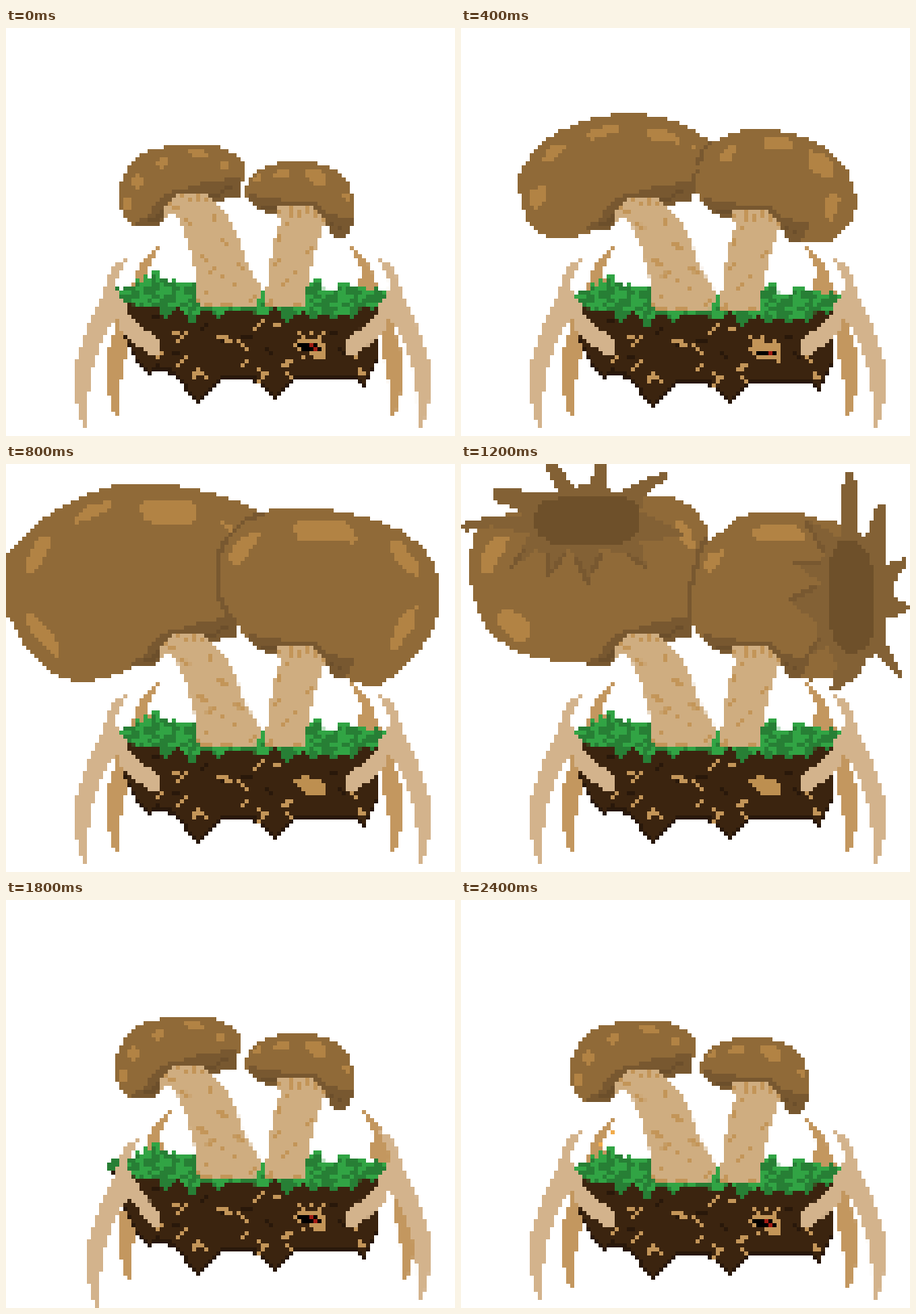
Animation of 555x505 px, one loop 2.6 s. Source, as an HTML page without scripts:

```html
<!DOCTYPE html>
<html lang="en">
<head>
<meta charset="utf-8">
<title>Walking mushrooms</title>
<style>
html, body { margin: 0; width: 100%; height: 100%; overflow: hidden; background: #fff; }
svg { display: block; width: 555px; height: 505px; shape-rendering: crispEdges; }

.cap { fill: #906a38; }
.shade { fill: #785830; }
.deep { fill: #6e502a; }
.hi { fill: #b28344; }
.flare { fill: #836135; }
.stem { fill: #cfad80; }
.leg { fill: #d3b38c; }
.back { fill: #c3975f; }
.soil { fill: #3b240f; }
.dark { fill: #29180a; }
.grass { fill: #277f35; }
.line { fill: none; stroke-width: 5; stroke-linecap: square; }
.tan { stroke: #c39558; }
.seam { stroke: #785830; }
.blade { stroke: #31a444; }

.body, .lcap, .lstem, .small, .open, .shut, .lf, .stubl, .rf, .stubr, .bl, .br {
  animation: 2.6s step-end infinite;
}
.stubl, .stubr { transform-origin: 190px 400px; }
.flash { visibility: hidden; animation: flash 2.6s step-end infinite; }
.t2 { animation-delay: .4s; }
.t3 { animation-delay: .6s; }
.t4 { animation-delay: .8s; }
.t5 { animation-delay: 1s; }
.t6 { animation-delay: 1.2s; }
.t12 { animation-delay: 2.4s; }
@keyframes flash { 0% { visibility: visible } 7.692%, 100% { visibility: hidden } }

.body { animation-name: bob; }
@keyframes bob {
  0%, 53.846%, 84.615% { transform: none }
  7.692%, 76.923%, 92.307%, 100% { transform: translateY(5px) }
}
.lcap { animation-name: sway; }
@keyframes sway {
  0%, 53.846%, 84.615% { transform: none }
  7.692%, 69.23%, 92.307%, 100% { transform: translateX(-5px) }
}
.lstem { animation-name: lean; }
@keyframes lean {
  0%, 53.846%, 84.615% { transform: none }
  7.692%, 69.23%, 92.307%, 100% { transform: matrix(1, 0, .036, 1, -12.4, 0) }
}
.small, .open { animation-name: rest; }
@keyframes rest {
  0%, 53.846%, 100% { visibility: visible }
  15.384% { visibility: hidden }
}
.shut { animation-name: shut; }
@keyframes shut {
  0%, 53.846%, 100% { visibility: hidden }
  23.076% { visibility: visible }
}
.lf { animation-name: lf; }
@keyframes lf {
  0%, 84.615%, 100% { transform: none }
  53.846% { transform: translate(20px, 0) }
  61.538% { transform: translate(20px, 10px) }
  69.23% { transform: translate(15px, 10px) }
  76.923% { transform: translate(5px, 5px) }
}
.stubl { animation-name: stubl; }
@keyframes stubl {
  0%, 84.615%, 100% { transform: none }
  53.846% { transform: scaleX(.6) }
  69.23% { transform: scaleX(.7) }
  76.923% { transform: scaleX(.9) }
}
.rf { animation-name: rf; }
@keyframes rf {
  0%, 92.307%, 100% { transform: none }
  76.923% { transform: translateX(-10px) }
  84.615% { transform: translateX(-20px) }
}
.stubr { animation-name: stubr; }
@keyframes stubr {
  0%, 92.307%, 100% { transform: none }
  76.923% { transform: scaleX(1.2) }
  84.615% { transform: scaleX(1.4) }
}
.bl, .br { animation-name: back; }
@keyframes back {
  0%, 92.307%, 100% { transform: none }
  61.538% { transform: translate(5px, -20px) }
  69.23% { transform: translate(15px, -10px) }
  76.923% { transform: translate(20px, -5px) }
  84.615% { transform: translate(20px, 0) }
}
</style>
</head>
<body>
<svg viewBox="0 0 555 505" xmlns="http://www.w3.org/2000/svg">
<defs>
  <!-- samples the middle of every 5 x 5 block and spreads it -->
  <filter id="pixel" filterUnits="userSpaceOnUse" x="0" y="0" width="555" height="505" color-interpolation-filters="sRGB">
    <feFlood x="2" y="2" width="1" height="1"/>
    <feComposite x="0" y="0" width="5" height="5"/>
    <feTile result="dots"/>
    <feComposite in="SourceGraphic" in2="dots" operator="in"/>
    <feMorphology operator="dilate" radius="2"/>
  </filter>

  <path id="soil" d="M130 333L145 380 163 415 177 431 188 423 208 430 237 465 270 434 295 434 312 440 332 461 355 436 375 434 430 434 443 446 450 430 460 410 460 370 467 338Z"/>
  <path id="grass" d="M125 325L137 319 142 324 150 318 160 318 160 310 170 314 171 304 180 309 180 300 190 300 190 311 197 310 200 320 206 309 210 316 240 315 310 315 317 325 322 318 370 320 380 310 390 310 388 322 408 325 410 315 425 315 425 324 430 319 440 319 452 326 460 319 458 325 470 325 468 332 455 350 440 343 430 360 415 354 405 362 395 352 380 361 370 350 358 356 345 365 335 346 318 356 300 350 270 351 262 361 255 350 240 351 230 368 223 354 212 346 195 361 190 346 165 346 155 341 145 343 135 335 125 335Z"/>
  <clipPath id="lawn"><use href="#grass"/></clipPath>
  <clipPath id="westward"><path d="M0 0H465V300H0Z"/></clipPath>

  <path id="leg" d="M150 285L135 290 126 310 117 335 105 360 95 385 87 410 85 420 85 440 87 465 95 494 100 494 102 455 105 430 115 395 125 372 137 362 150 362 150 345 138 330 136 315 140 302Z"/>
  <path id="stub" d="M132 338L140 345 190 388 190 403 177 406 140 372Z"/>
  <path id="hind" d="M190 270L180 275 165 295 155 320 140 350 130 390 125 405 125 440 130 465 135 480 140 480 140 450 145 425 150 400 150 385 160 350 180 325 180 312 174 306 180 288Z"/>

  <g id="lshade">
    <path class="shade" d="M290 185L245 190 230 197 207 200 190 212 180 224 176 234 163 239 160 245 187 245 195 238 195 222 210 207 250 206 255 214 285 211 290 205Z"/>
    <path class="line" stroke="#6c4f2b" d="M252.5 207.5h10l10-10h5M177.5 237.5h10l5-10"/>
  </g>
  <g id="rshade">
    <path class="shade" d="M300 203L320 211 337 211 342 216 385 215 398 229 430 237 426 250 420 260 410 260 400 254 395 239 380 221 337 221 332 230 315 227 300 215Z"/>
    <path class="line" stroke="#6c4f2b" d="M317.5 222.5h15M402.5 242.5l5 5h5"/>
  </g>
  <!-- undersides shared by every swollen cap -->
  <g id="rims">
    <use href="#lshade" x="-5"/>
    <use href="#rshade"/>
  </g>

  <path id="lhuge" class="cap" d="M135 21L165 19 205 20 230 26 260 32 290 42 318 56 300 100 285 190 285 208 250 211 246 205 205 205 190 219 190 235 165 243 140 255 110 263 85 265 60 255 40 239 20 217 8 192 0 180 0 110 10 95 35 70 75 44 110 29Z"/>
  <g id="lhugespots" class="hi">
    <path d="M80 65L105 45 130 41 127 53 85 70ZM165 45L175 38 230 40 237 55 230 70 170 67ZM265 67L282 70 277 80ZM25 115L40 87 55 85 52 105 32 133 25 130ZM25 180L35 180 62 210 66 230 60 235 28 200Z"/>
  </g>
  <g id="rhuge">
    <path class="cap" d="M330 50L385 49 420 55 460 65 490 78 512 95 527 115 536 140 536 177 527 202 507 232 487 252 462 268 440 268 415 259 400 239 381 221 337 221 332 230 310 220 295 207 285 190 275 185 262 155 262 105 270 90 300 65Z"/>
    <path class="line seam" d="M317.5 57.5L297.5 62.5 272.5 87.5 262.5 107.5V157.5L277.5 187.5"/>
    <path class="hi" d="M355 70L370 63 420 65 435 87 430 95 418 90 360 88ZM275 110L290 85 315 77 310 90 290 120 278 117ZM475 90L490 92 510 120 508 133 495 130 475 103ZM475 215L490 180 508 172 505 195 485 223 475 223Z"/>
  </g>

  <g id="bursts">
    <path class="flare" d="M0 74L8 66 38 60 80 62 60 46 38 40 38 28 50 25 95 30 118 28 103-5 115-5 130 10 142 23 158 20 168-5 178-5 178 23 192 32 212 22 230 12 256 4 252 14 225 36 222 54 240 62 278 82 235 90 222 92 230 126 208 108 172 100 157 145 143 110 130 100 108 137 105 106 92 102 60 126 74 100 86 82 38 72 8 78Z"/>
    <path class="line seam" d="M62.5 122.5l15-20M107.5 132.5V107.5M112.5 127.5l15-20M157.5 142.5L142.5 112.5M162.5 127.5L172.5 107.5M227.5 122.5L207.5 107.5"/>
    <path class="flare" d="M474 4L483 4 488 18 490 80 500 88 512 48 524 42 524 105 527 120 552 108 547 125 537 140 537 158 557 175 540 183 526 187 526 215 549 261 540 258 522 241 512 231 500 238 488 262 465 274 457 274 464 245 452 220 427 236 442 205 440 190 405 165 445 142 410 116 450 112 425 62 458 80 470 88 470 50Z"/>
    <path class="line seam" d="M427.5 67.5l20 35M412.5 117.5h30M407.5 162.5l30-15M427.5 232.5l15-20"/>
    <path class="deep" d="M100 42L120 37 205 37 222 47 222 72 210 87 190 97 120 97 95 82 88 62ZM465 92H490L502 105 512 130 512 200 500 225 480 230 463 215 453 190 453 120Z"/>
  </g>
</defs>

<g filter="url(#pixel)">
  <use href="#hind" class="back bl"/>
  <g class="br"><use href="#hind" class="back" transform="translate(615) scale(-1 1)"/></g>

  <g class="body">
    <use href="#soil" class="dark"/>
    <use href="#soil" class="soil" y="-6"/>
    <path class="line" stroke="#29180a" d="M182.5 357.5h5M267.5 387.5l5-5M292.5 382.5h10M242.5 372.5l5-5M322.5 397.5l5 5M402.5 377.5h5M207.5 402.5h5M412.5 397.5l5 5"/>
    <path class="line tan" d="M212.5 387.5l10-10M207.5 377.5h5M262.5 382.5h5l10 5M307.5 372.5l10-10M292.5 417.5l5-5M187.5 407.5l5-5M212.5 417.5l10-10M237.5 422.5l-5 10M242.5 427.5l5 5M287.5 387.5l10 10M312.5 437.5l10-10M312.5 422.5l5 5M342.5 417.5l10-5M347.5 427.5l5 5M437.5 422.5v5h5M427.5 402.5l5 5M437.5 382.5l5-5M332.5 367.5h5"/>

    <g class="open">
      <path fill="#c39558" d="M355 390L365 384 390 385 396 395 394 405 360 400Z"/>
      <path d="M360 390H385V395H390V400H365V395H360Z"/>
      <path fill="#a01c14" d="M375 390H380V395H385V400H380V395H375Z"/>
      <path class="line tan" d="M367.5 382.5l-5-5M377.5 377.5h0M387.5 382.5l5-5M367.5 407.5h0M377.5 402.5l10 5M392.5 402.5v5"/>
    </g>
    <g class="flash t2">
      <path fill="#c39558" d="M355 390L368 379 380 384 390 381 396 395 394 408 365 405Z"/>
      <path d="M365 395H390V400H365Z"/>
      <path fill="#a01c14" d="M380 395H385V400H380Z"/>
      <path class="line tan" d="M362.5 382.5l-5-5M372.5 377.5h0"/>
    </g>
    <path class="shut" fill="#bd8f50" d="M355 383L363 386 368 379 378 384 390 383 390 391 397 395 390 408 375 405 365 400 355 390Z"/>

    <use href="#grass" class="grass"/>
    <g clip-path="url(#lawn)" class="line blade" stroke-dasharray="10 15 0 20 15 10 5 25">
      <path d="M160 312.5h15M172.5 307.5h0M182.5 302.5h5v10M207.5 312.5h0M380 312.5h10M412.5 317.5h10" stroke-dasharray="none"/>
      <path d="M165 317.5h300M140 327.5h330M165 332.5h300"/>
      <path d="M145 337.5h310M135 342.5h330" stroke-dashoffset="35"/>
      <path d="M170 347.5h290M150 322.5h320" stroke-dashoffset="60"/>
      <path d="M180 352.5h250" stroke-dashoffset="20"/>
    </g>

    <g class="lstem">
      <path class="stem" d="M190 235V225L205 208 210 203 255 203 258 216 272 230 280 242 289 263 295 285 306 306 315 320 315 332 310 342 300 345 240 345 235 338 235 305 225 265 215 240 205 230Z"/>
      <path class="line tan" d="M192.5 227.5h0M202.5 217.5l5 5M217.5 207.5h0M227.5 212.5h0M237.5 207.5v5M247.5 212.5h0M212.5 222.5h0M222.5 237.5l5 5M257.5 232.5v5M267.5 262.5l5 5M242.5 282.5l5 5M257.5 297.5l-5 5M267.5 307.5h0M287.5 292.5l5 5M282.5 317.5h0M237.5 337.5l5 5h10M267.5 342.5h10M302.5 337.5l5-5M247.5 327.5h0"/>
    </g>
    <path class="stem" d="M335 222L385 220 398 240 390 250 380 285 375 310 370 330 370 343 345 345 325 345 320 335 325 305 330 270 340 240 335 230Z"/>
    <path class="line tan" d="M337.5 227.5h0M352.5 222.5v10M362.5 227.5v5M372.5 222.5v5M382.5 227.5v5M392.5 237.5h0M347.5 242.5h0M337.5 257.5v5M372.5 277.5l5-5M332.5 292.5l5-5M357.5 302.5h0M342.5 317.5l5-5M327.5 337.5l-5 5h5M357.5 342.5h5"/>

    <g class="small">
      <g class="lcap">
        <path class="cap" d="M180 150L205 145 255 145 270 150 290 160 295 172 295 185 290 190 290 205 285 210 255 214 250 206 210 207 195 222 195 238 187 245 155 245 145 235 140 215 140 197 150 175 160 160Z"/>
        <use href="#lshade"/>
        <path class="hi" d="M185 170L190 160 200 160 200 170 190 175ZM225 150H245L250 160H230ZM265 165H275V175H270V180L265 175ZM155 195V185L165 180 170 190 162 200ZM145 210H155V225H145Z"/>
      </g>
      <path class="cap" d="M330 168L345 165 375 165 400 172 415 182 425 195 430 210 430 237 425 252 420 260 410 260 400 254 395 239 381 221 337 221 332 230 315 227 300 215 295 205 300 187 310 176Z"/>
      <use href="#rshade"/>
      <path class="hi" d="M305 185L310 180H315V190H305ZM330 180L335 175H350V185H330ZM370 175H385L395 185V193H380L370 185ZM410 205H425V220L420 215Z"/>
    </g>

    <g class="flash t2">
      <path class="cap" d="M185 102L215 100 245 105 270 112 290 123 310 137 300 150 288 185 285 208 250 211 246 205 205 205 190 219 190 235 180 243 155 248 140 255 105 253 85 240 75 210 70 190 72 175 85 155 100 137 120 123 150 110Z"/>
      <path class="cap" d="M345 122L375 120 410 125 440 137 465 155 480 175 490 210 485 230 470 250 455 260 425 260 410 257 395 239 381 221 337 221 332 230 310 220 295 207 288 190 290 165 300 145 320 132Z"/>
      <path class="line seam" d="M307.5 137.5l-10 10-5 20-5 15v15"/>
      <path class="hi" d="M155 125L175 117 195 117 195 123 160 135ZM230 122L250 120 270 130 270 138 235 135ZM280 140H290V150ZM100 160L110 142 130 142 115 157ZM85 195L103 190 103 207 95 220 85 215ZM320 150L330 140 340 142 335 157 322 160ZM375 133L385 130 410 133 408 145 378 145ZM430 147L445 150 460 165 458 178 445 178 430 167ZM450 210L460 198 470 205 460 235 448 230Z"/>
      <use href="#rims"/>
    </g>

    <g class="flash t3">
      <path class="cap" d="M160 62L190 60 225 63 250 70 275 77 300 90 316 102 300 125 285 185 285 208 250 211 246 205 205 205 190 219 190 235 165 245 130 258 95 259 70 247 45 225 28 198 20 175 25 145 45 110 80 85 120 70Z"/>
      <path class="cap" d="M340 87L380 85 415 90 450 102 477 118 500 140 515 165 520 190 508 220 490 243 470 259 445 264 415 257 395 239 381 221 337 221 332 230 310 220 295 207 280 185 275 160 278 135 300 105Z"/>
      <path class="line seam" d="M312.5 97.5L292.5 112.5 277.5 137.5V162.5L282.5 187.5"/>
      <path class="hi" d="M120 97L140 82 162 80 160 90 125 103ZM195 85L240 80 254 95 250 105 200 100ZM273 105H285L282 115ZM60 140L75 115 92 113 85 132 65 150ZM50 190L65 185 82 212 78 230 65 222ZM298 130L312 113 327 112 322 125 302 140ZM365 102L380 97 415 100 422 115 370 117ZM452 120L467 122 485 145 482 157 465 155 452 137ZM462 212L475 190 488 188 478 225 462 227Z"/>
      <use href="#rims"/>
    </g>

    <g class="flash t4">
      <use href="#lhuge"/><use href="#lhugespots"/>
      <use href="#rhuge"/>
      <use href="#rims"/>
    </g>

    <g class="flash t5">
      <use href="#lhuge"/><use href="#lhugespots"/>
      <use href="#rhuge" clip-path="url(#westward)"/>
      <use href="#rims"/>
      <use href="#bursts"/>
    </g>

    <g class="flash t6">
      <path class="cap" d="M95 40L225 35 260 35 285 48 302 68 306 90 290 120 285 150 285 208 250 211 246 205 205 205 190 219 190 235 180 243 130 241 100 236 70 229 40 209 25 187 15 157 9 125 15 83 35 68Z"/>
      <path class="cap" d="M320 80L340 62 365 55 425 57 445 65 465 67 490 95 500 230 480 257 460 260 430 263 405 257 395 239 381 221 337 221 332 230 310 220 295 207 287 195 285 150 292 105Z"/>
      <path class="line seam" d="M302.5 87.5L292.5 107.5 287.5 137.5 282.5 147.5V192.5"/>
      <path class="hi" d="M25 130L28 100 45 83 58 87 55 100 35 133ZM45 180L55 173 82 187 85 210 70 215 45 195ZM265 65L280 70 290 95 285 103 270 87ZM360 77L375 70 415 70 428 87 420 92 365 88ZM300 125L305 107 325 100 322 113 305 130Z"/>
      <use href="#rims"/>
      <use href="#bursts"/>
    </g>
  </g>

  <path class="flash t12" fill="#f2ac4c" d="M170 300H175V305H170ZM185 285H190V290H185Z"/>

  <use href="#stub" class="leg stubl"/>
  <use href="#leg" class="leg lf"/>
  <g transform="translate(610) scale(-1 1)">
    <use href="#stub" class="leg stubr"/>
    <use href="#leg" class="leg rf"/>
  </g>
</g>
</svg>
</body>
</html>
```
